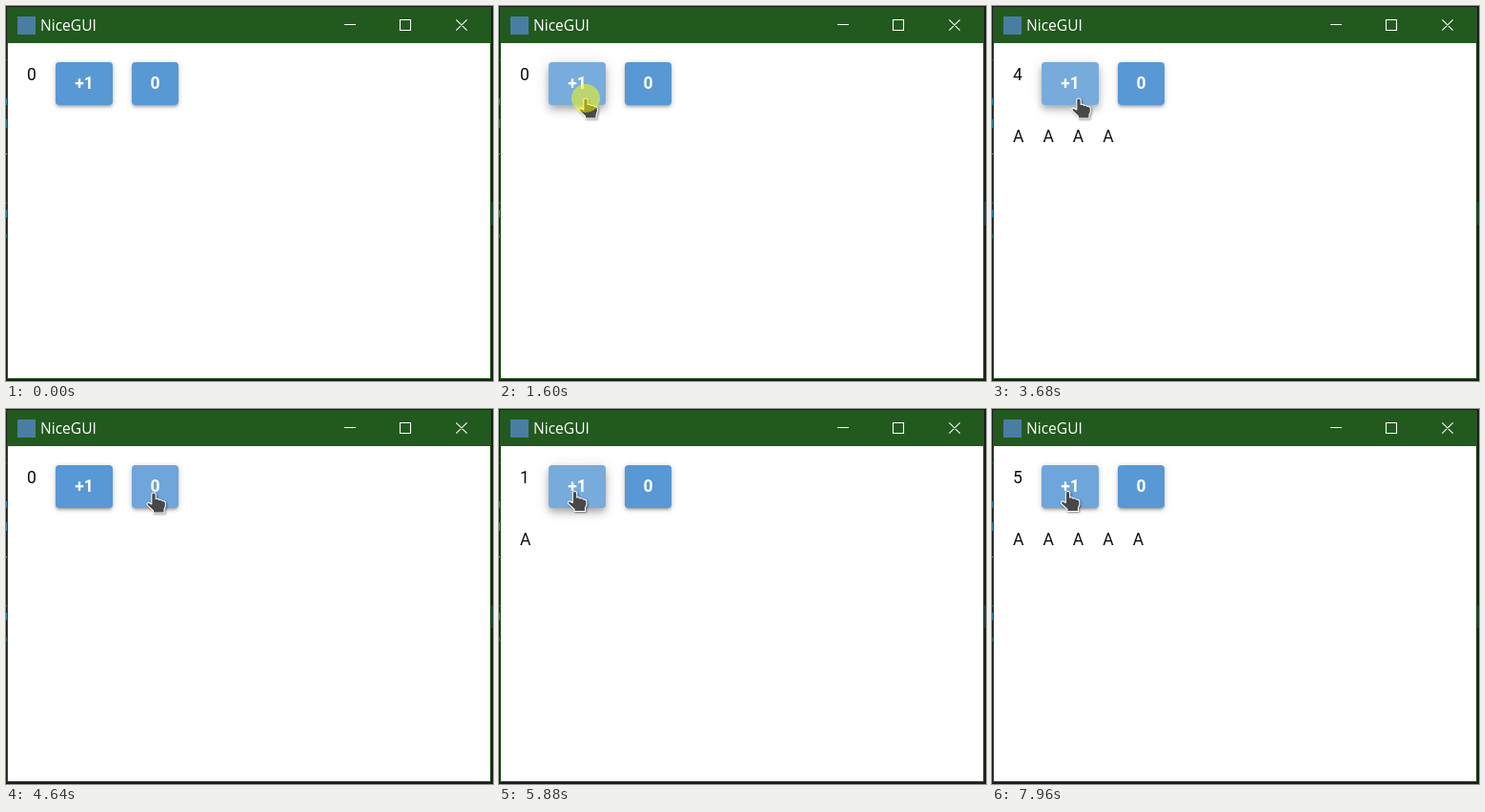
An HTML page for the animation above (9.31 s loop, 511 by 394 pixels).

```html
<!DOCTYPE html>
<html lang="en">
<head>
<meta charset="utf-8">
<title>NiceGUI</title>
<style>
  html, body { margin: 0; width: 100%; height: 100%; overflow: hidden; background: #1c1c1c; }
  #stage { position: relative; width: 511px; height: 394px; overflow: hidden; background: #1c1c1c; }
  #stage > * { position: absolute; }
  #window { left: 1px; top: 1px; width: 508px; height: 391px; background: #22591e; }
  #page { left: 2px; top: 39px; width: 506px; height: 352px; background: #fff; }
  #title { left: 36px; top: 9px; font: 15.6px/22px "Open Sans", "Noto Sans", sans-serif; color: #fff; }
  .text { left: 22px; font: 17.5px/26.25px Roboto, sans-serif; color: #0b0b0b; white-space: pre; }
  #count { top: 59px; }
  #row { top: 124px; display: flex; gap: 20px; }
  .btn { top: 59px; height: 45px; border-radius: 3.75px; text-align: center;
         font: 600 17.5px/45px Roboto, sans-serif; color: #fff; }
  svg { left: 0; top: 0; }
</style>
</head>
<body>
<div id="stage">
  <div id="window"></div>
  <div id="page"></div>
  <div id="title">NiceGUI</div>
  <div id="count" class="text"></div>
  <div id="row" class="text"></div>
  <div id="plus" class="btn">+1</div>
  <div id="zero" class="btn">0</div>
  <svg width="511" height="394" viewBox="0 0 511 394">
    <rect x="12" y="11" width="19" height="19" fill="#4a7da3"/>
    <path d="M355 19.5h12M413.5 14.5h11v11h-11zM472.3 14.3l11.4 11.4M483.7 14.3l-11.4 11.4"
          fill="none" stroke="#fff" stroke-width="1.1"/>
    <path d="M0 97h1v7H0zM0 119h1v9H0zM0 214h1v8H0z" fill="#2878a8"/>
    <path d="M0 56h1v1H0zM0 206h1v2H0zM0 240h1v4H0z" fill="#176058"/>
    <path d="M0 155h1v1H0z" fill="#aaa"/>
    <path d="M509 206h2v24h-2z" fill="#1d3b3b"/>
    <g id="cursor" stroke="#fff" stroke-width="1.1" stroke-linejoin="round" fill="#484848"
       style="filter: drop-shadow(1px 1px 1px rgba(0,0,0,.45))">
      <path id="arrow" d="M0 0V16.5L4 13.5L7 19.5L10 18L7.5 12H12.5Z"/>
      <path id="hand" d="M-2.2 2Q-2.2 0 0 0T2.2 2V6.5Q4.5 5.8 5.6 7.4Q8 6.8 9 8.5Q12.4 8 12.4 11.5V14L11 17.5V21H-.5V19L-6.6 13.2Q-7.8 11.2 -6 10.4Q-4.6 10 -2.2 12Z"/>
    </g>
    <circle id="spot" r="15" fill="#ff0" fill-opacity=".5"/>
  </svg>
</div>
<script>
const LOOP = 9310, STEP = 40;
const HOLD = 140, REPLY = 200, FADE = 140;
const $ = id => document.getElementById(id);
const clamp = v => Math.max(0, Math.min(1, v));
const mix = (a, b, k) => a + (b - a) * k;

const buttons = [
  { el: $("plus"), x: 52, w: 60, next: n => n + 1 },
  { el: $("zero"), x: 132, w: 49, next: () => 0 }
];
for (const { el, x, w } of buttons) {
  el.style.left = x + "px";
  el.style.width = w + "px";
}

// Pointer moves; "via" bends the path
const outside = [395, 412];
const moves = [
  { start: 160, end: 500, to: [342, 277] },
  { start: 800, end: 1240, to: [91, 97], via: [223, 299] },
  { start: 3920, end: 4240, to: [155, 88] },
  { start: 4800, end: 5120, to: [79.5, 86.5] }
];

function tip(t) {
  let pos = outside;
  for (const { start, end, to, via } of moves) {
    if (t < start) break;
    const from = pos, k = clamp((t - start) / (end - start));
    pos = to.map((b, i) => {
      const a = from[i], c = via ? via[i] : (a + b) / 2;
      return mix(mix(a, c, k), mix(c, b, k), k);
    });
  }
  return pos;
}

const over = (b, [x, y]) => x >= b.x && x <= b.x + b.w && y >= 59 && y <= 104;

// Two runs of five evenly spaced clicks, with single clicks before each
const run = (start, gap) => Array.from({ length: 5 }, (_, i) => start + i * gap);
const clicks = [500, ...run(1520, 500), 4360, ...run(5240, 490)]
  .map(at => ({ at, button: buttons.find(b => over(b, tip(at))) }));

const countAt = t => clicks.reduce(
  (n, { at, button }) => button && t >= at + REPLY ? button.next(n) : n, 0);

// Share of the last three steps the pointer spent on the button
const hoverLevel = (b, t) =>
  [0, 1, 2].filter(i => over(b, tip(t - i * STEP))).length / 3;

const pressLevel = (b, t) => Math.max(...clicks.map(({ at, button }) =>
  button === b && t >= at
    ? Math.min(clamp((t - at + STEP) / 120), clamp(1 - (t - at - HOLD) / FADE))
    : 0));

function shadow(k) {
  const px = (rest, down) => mix(rest, down, k) * 1.25 + "px";
  return `0 ${px(1, 3)} ${px(5, 5)} ${px(0, -1)} rgba(0,0,0,.2),
          0 ${px(2, 5)} ${px(2, 8)} 0 rgba(0,0,0,.14),
          0 ${px(3, 1)} ${px(1, 14)} ${px(-2, 0)} rgba(0,0,0,.12)`;
}

function paint(b, t) {
  const press = pressLevel(b, t);
  const light = .13 * hoverLevel(b, t) + .06 * press;
  b.el.style.background = `rgb(${[88, 152, 212].map(c => Math.round(mix(c, 255, light)))})`;
  b.el.style.boxShadow = shadow(press);
}

let shown = -1;
function setCount(n) {
  if (n === shown) return;
  shown = n;
  $("count").textContent = n;
  $("row").innerHTML = "<span>A</span>".repeat(n);
}

const show = (id, on) => $(id).setAttribute("visibility", on ? "visible" : "hidden");

function draw(time) {
  const t = Math.floor(time % LOOP / STEP) * STEP;
  const pos = tip(t);
  const onButton = buttons.some(b => over(b, pos));
  buttons.forEach(b => paint(b, t));
  setCount(countAt(t));
  for (const id of ["cursor", "spot"]) $(id).setAttribute("transform", `translate(${pos})`);
  show("arrow", !onButton);
  show("hand", onButton);
  show("spot", clicks.some(({ at }) => t >= at && t < at + HOLD));
}

const start = performance.now();
function tick() {
  draw(performance.now() - start);
  requestAnimationFrame(tick);
}
tick();
</script>
</body>
</html>
```
